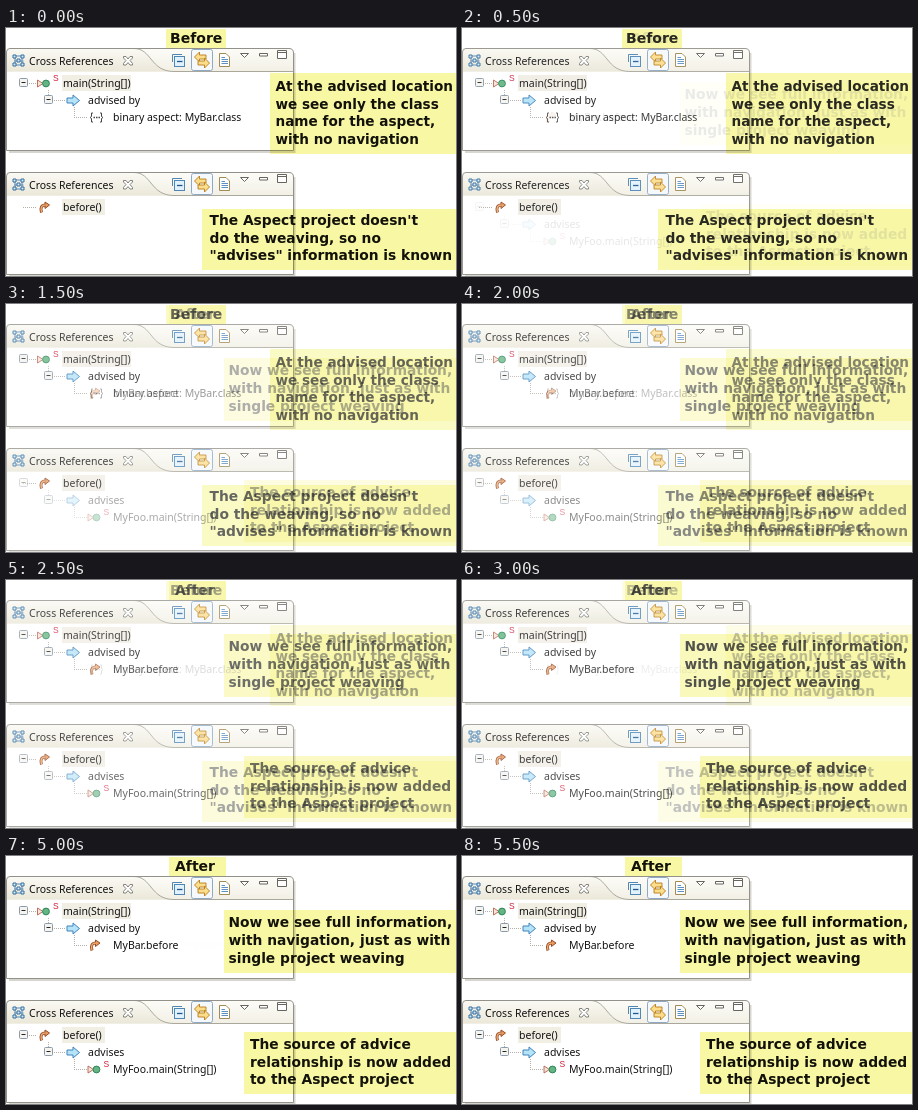
An HTML page that plays this animation: 450 by 248 pixels, repeating every 8 s.

```html
<!DOCTYPE html>
<html lang="en">
<head>
<meta charset="utf-8">
<title>Cross references before and after</title>
<style>
  html, body { margin: 0; width: 100%; height: 100%; overflow: hidden; background: #fff; }
  svg { display: block; width: 100%; height: 100%; background: #fff; }
  .ui { font: 10.5px "Noto Sans", "Open Sans", sans-serif; fill: #111; }
  .note { font-family: "DejaVu Sans", sans-serif; font-weight: bold; fill: #12120a; }
  .mark { fill: #f8f7a4; filter: url(#soft); }
  .notes { mix-blend-mode: multiply; }
  .dots { stroke: #b4b0a8; stroke-dasharray: 1 1; fill: none; }
</style>
</head>
<body>
<svg viewBox="0 0 450 248" xmlns="http://www.w3.org/2000/svg">
  <defs>
    <filter id="soft" x="-5%" y="-15%" width="110%" height="130%"><feGaussianBlur stdDeviation=".7"/></filter>
    <linearGradient id="bar" x2="0" y2="1">
      <stop offset="0" stop-color="#fcfbf7"/><stop offset="1" stop-color="#f2f0e5"/>
    </linearGradient>
    <linearGradient id="tab" x2="0" y2="1">
      <stop offset="0" stop-color="#faf9f3"/><stop offset="1" stop-color="#ebe8d9"/>
    </linearGradient>

    <g id="expander">
      <rect x="-4" y="-4" width="8" height="8" rx="1" fill="#f6f4ee" stroke="#8b9aaa"/>
      <path d="M-2 0H2" stroke="#222"/>
    </g>
    <g id="method">
      <path d="M-6-3.500L-.5 0L-6 3.500Z" fill="#f8e3da" stroke="#b5624c" stroke-width=".9"/>
      <circle cx="2.500" r="3.400" fill="#63b583" stroke="#2f8658"/>
      <text x="9.500" y="-3" style="font:8.5px 'Liberation Sans',sans-serif" fill="#d0203c">S</text>
    </g>
    <path id="arrow" d="M-6-2.5H0V-5.5L6.5 0L0 5.5V2.5H-6Z" fill="#b5e3f8" stroke="#3f83bd"/>
    <g id="advice" fill="none">
      <path d="M-3 5C-4.500 0-3-2.500 1-2.500" stroke="#984b25" stroke-width="3"/>
      <path d="M.5-5.500L5-2.500L.5 1Z" fill="#e99a5c" stroke="#984b25"/>
      <path d="M-3 4.500C-4.200 0-3-2.500 1-2.500" stroke="#f0ae74" stroke-width="1.300"/>
    </g>
    <g id="braces" fill="none" stroke="#444">
      <path d="M-3-4.5H-4.5V-1L-6 0L-4.5 1V4.5H-3M4-4.5H5.5V-1L7 0L5.5 1V4.5H4"/>
      <path d="M-2.5 0H4" stroke-width="1.5" stroke-dasharray="1.5 1"/>
    </g>

    <g id="panel">
      <path d="M3 124H288.5V25" fill="none" stroke="#d6d5d0" stroke-width="2"/>
      <path d="M.5 122.5V24Q.5 20.5 4 20.5H283Q287.5 20.5 287.5 25V122.5Z" fill="#fff"/>
      <path d="M1 43.500V24Q1 21 4 21H283Q287 21 287 25V43.500Z" fill="url(#bar)"/>
      <path d="M1 43.500V24Q1 21 4 21H128C146 21 144 43.500 168 43.500Z" fill="url(#tab)"/>
      <path d="M128 20.5C146 20.5 144 43.5 168 43.5H287" fill="none" stroke="#aaa89d"/>
      <path d="M.5 122.5V24Q.5 20.5 4 20.5H283Q287.5 20.5 287.5 25V122.5Z" fill="none" stroke="#92918a"/>
      <g transform="translate(.5 1.500)">
        <path d="M8.5 27V35M15.5 27V35M8 31.5H17M8 26.5H16M8 35.5H16" stroke="#5c86b0" fill="none"/>
        <path d="M6.5 25.5h3v3h-3zM14.5 25.5h3v3h-3zM10.5 29.5h3v3h-3zM6.5 33.5h3v3h-3zM14.5 33.5h3v3h-3z" fill="#d5eafa" stroke="#336f9f"/>
      </g>
      <text class="ui" x="23" y="36.500">Cross References</text>
      <g transform="translate(0 1)">
        <path d="M117.5 27.5H120L122 30L124 27.5H126.5V29L124 31.5L126.5 34.5V36H124L122 33.5L120 36H117.5V34.5L120 31.5L117.5 29Z" fill="#fff" stroke="#77766f" stroke-width=".9"/>
        <g stroke="#4e86b6">
          <path d="M166.5 33V25.5H176" fill="none"/>
          <rect x="168.5" y="27.5" width="10" height="10" fill="#e2f2fd"/>
          <path d="M171 32.5H176.5" stroke="#24578d" stroke-width="1.3"/>
        </g>
        <rect x="185.5" y="20.5" width="21" height="21" rx="2" fill="#f6f9fc" stroke="#8ea9c6"/>
        <g fill="#fbdd8c" stroke="#b87b17" stroke-width=".9">
          <path d="M200 26H193.500V23L188.500 28L193.500 33V30H200Z"/>
          <path d="M192 32H198.500V29L203.500 34L198.500 39V36H192Z"/>
        </g>
        <path d="M213.5 24.5H220L223.5 28V37.5H213.5Z" fill="#fff" stroke="#a08b54"/>
        <path d="M215.5 28.5H219M215.5 30.5H222M215.5 32.5H222M215.5 34.5H222" stroke="#5d91c4"/>
      </g>
      <g fill="#fff" stroke="#66655e">
        <path d="M234.5 25.5H242.5L238.5 29.5Z"/>
        <path d="M253.5 25.5h8v2.5h-8z"/>
        <path d="M271.5 22.5h9v8h-9zM271.5 24.5h9"/>
      </g>
    </g>
  </defs>
  <g id="oldPanels"></g>
  <g id="newPanels"></g>
  <g id="oldNotes" class="notes"></g>
  <g id="newNotes" class="notes"></g>
</svg>
<script>
  const STEP = 500, LOOP = 8000, FADE = 5250;
  const PANEL_GAP = 124;
  const [oldPanels, newPanels, oldNotes, newNotes] =
    ['oldPanels', 'newPanels', 'oldNotes', 'newNotes'].map(id => document.getElementById(id));

  const use = (id, x, y) => `<use href="#${id}" x="${x}" y="${y}"/>`;
  const label = (x, y, s) => `<text class="ui" x="${x}" y="${y + 4}">${s}</text>`;

  function note([left, top, w, h], x, y, size, lines) {
    return `<rect class="mark" x="${left}" y="${top}" width="${w}" height="${h}"/>` +
      lines.map((s, i) =>
        `<text class="note" x="${x}" y="${y + i * 17.8}" font-size="${size}">${s}</text>`).join('');
  }

  // rows: [icon, text, icon x] for each level of the tree
  function panel(dy, selected, rows) {
    const ys = [55, 72, 89], textX = [57, 82, 107];
    let s = use('panel', 0, 0) +
      `<rect x="56" y="47" width="${selected}" height="16" fill="#f1eee4"/>` +
      '<path class="dots" d="M17 55.5H30"/>';
    if (rows.length > 1) {
      s += '<path class="dots" d="M42.5 62V72M42 72.5H60M68.5 79V89M68 89.5H82"/>' +
        use('expander', 17.5, 54.5) + use('expander', 42.5, 71.5);
    }
    rows.forEach(([icon, text, x], i) => {
      s += use(icon, x, ys[i] + .5) + label(textX[i], ys[i], text);
    });
    return `<g transform="translate(0 ${dy})">${s}</g>`;
  }

  const mainRow = ['method', 'main(String[])', 37.5];
  const adviceRow = ['advice', 'before()', 38.5];

  oldPanels.innerHTML =
    panel(0, 69, [mainRow, ['arrow', 'advised by', 67],
      ['braces', 'binary aspect: MyBar.class', 90]]) +
    panel(PANEL_GAP, 43, [adviceRow]);

  newPanels.innerHTML =
    panel(0, 69, [mainRow, ['arrow', 'advised by', 67], ['advice', 'MyBar.before', 89]]) +
    panel(PANEL_GAP, 43, [adviceRow, ['arrow', 'advises', 67],
      ['method', 'MyFoo.main(String[])', 88]]);

  oldNotes.innerHTML =
    note([160, 1, 60, 19], 164, 15, 14, ['Before']) +
    note([264, 45, 190, 81], 269.5, 62.7, 13.6, ['At the advised location',
      'we see only the class', 'name for the aspect,', 'with no navigation']) +
    note([196, 181, 258, 61], 203.5, 196.7, 13.8, ["The Aspect project doesn't",
      'do the weaving, so no', '"advises" information is known']);

  newNotes.innerHTML =
    note([163, 1, 57, 19], 169, 15, 14, ['After']) +
    note([218, 54, 236, 63], 222.5, 71, 13.8, ['Now we see full information,',
      'with navigation, just as with', 'single project weaving']) +
    note([238, 176, 216, 62], 244, 192.7, 13.8, ['The source of advice',
      'relationship is now added', 'to the Aspect project']);

  // The old view fades out while the new one fades in, both over white.
  function draw() {
    const elapsed = (performance.now() - start) % LOOP;
    const t = Math.min(Math.floor(elapsed / STEP) * STEP / FADE, 1);
    const mix = Math.sin(t * Math.PI / 2) ** 1.25;
    for (const g of [oldPanels, oldNotes]) g.setAttribute('opacity', 1 - mix);
    for (const g of [newPanels, newNotes]) g.setAttribute('opacity', mix);
    requestAnimationFrame(draw);
  }
  const start = performance.now();
  draw();
</script>
</body>
</html>
```
